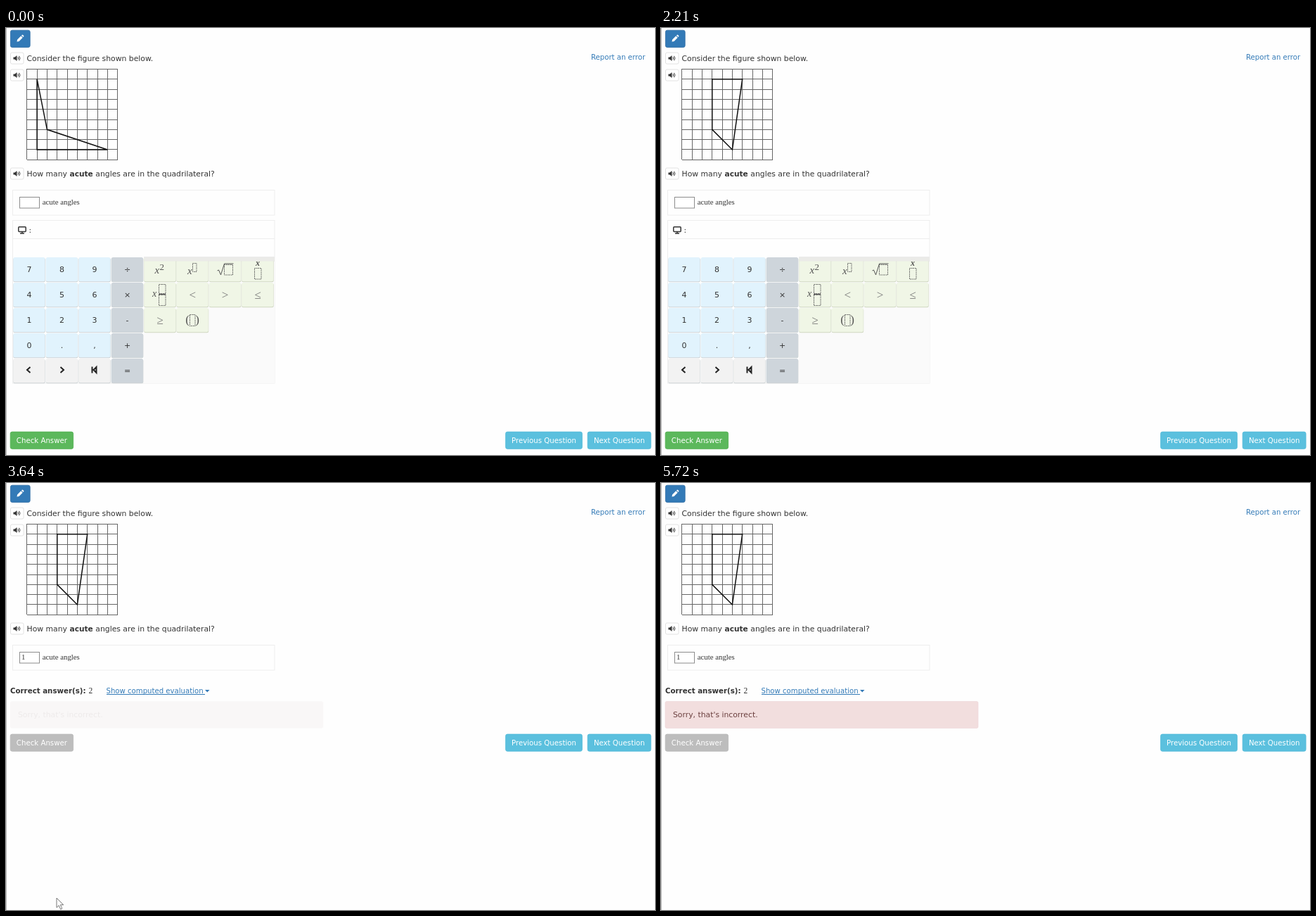
An HTML page that plays this animation: 923x607 px, repeating every 6.11 s.

```html
<!DOCTYPE html>
<html lang="en">
<head>
<meta charset="utf-8">
<title>Acute angles</title>
<style>
html, body { margin: 0; width: 100%; height: 100%; overflow: hidden; background: #fefefe; }
svg { display: block; width: 923px; height: 607px; }
text { font-family: "DejaVu Sans", Verdana, sans-serif; font-size: 10.82px; fill: #333; white-space: pre; }
.small { font-size: 10.15px; }
.key { font-size: 11px; text-anchor: middle; }
.label { font-size: 10.2px; text-anchor: middle; fill: #fff; }
.bold { font-weight: bold; font-size: 10.6px; }
.link { fill: #337ab7; }
.serif { font-family: "Liberation Serif", "Times New Roman", serif; }
.math { font-family: "Liberation Serif", "Times New Roman", serif; font-style: italic; font-size: 15px; fill: #555; }
.upright { font-style: normal; font-size: 17px; }
.sign { font-family: "Liberation Serif", "Times New Roman", serif; font-size: 17px; fill: #777; text-anchor: middle; }
.slot { fill: none; stroke: #555; stroke-dasharray: 1.5 1; }
</style>
</head>
<body>
<svg id="stage" viewBox="0 0 923 607"></svg>
<script>
const LOOP = 6110, STEP = 130;
const CELL = 14.32, LEFT = 29.8, TOP = 58.4;
const stage = document.getElementById('stage');

const rect = (x, y, w, h, fill, more = '') =>
  `<rect x="${x}" y="${y}" width="${w}" height="${h}" fill="${fill}" ${more}/>`;
const text = (x, y, s, cls = '', more = '') =>
  `<text x="${x}" y="${y}" class="${cls}" ${more}>${s}</text>`;
const path = (d, more) => `<path d="${d}" ${more}/>`;
const group = (id, body) => `<g id="${id}">${body}</g>`;
const slot = (x, y, w, h) => rect(x, y, w, h, 'none', 'class="slot"');
const line = 'fill="none" stroke="#333" ';

function button(x, y, w, label, fill, edge, id = '') {
  return rect(x + .4, y + .1, w - .8, 24.2, fill, `rx="2.5" id="${id}" stroke="${edge}" stroke-width=".8"`) +
    text(x + w / 2, y + 16.2, label, 'label');
}

function speaker(y) {
  return rect(6.5, y - 8, 18.5, 16, '#fff', 'rx="2" stroke="#e2e2e2"') +
    path(`M10.5 ${y - 1.5}h2l3-2.5v8l-3-2.5h-2z`, 'fill="#333"') +
    path(`M17 ${y - 1.8}q1.4 1.8 0 3.6M18.6 ${y - 3.2}q2.6 3.2 0 6.4`, line);
}

function grid() {
  let d = '';
  for (let i = 0; i < 10; i++) {
    const p = i * CELL;
    d += `M${LEFT + p} ${TOP}v${CELL * 9}M${LEFT} ${TOP + p}h${CELL * 9}`;
  }
  return path(d, 'stroke="#666" shape-rendering="crispEdges"');
}

const shapes = [
  [[1, 1], [2, 6], [8, 8], [1, 8]],
  [[4, 1], [6, 3], [6, 8], [3, 8]],
  [[3, 1], [6, 1], [5, 8], [3, 6]]
].map((pts, i) => {
  const at = pts.map(([x, y]) => [LEFT + x * CELL, TOP + y * CELL]);
  return `<polygon id="shape${i}" points="${at.join(' ')}" fill="none" stroke="#111" stroke-width="1.5"/>`;
}).join('');

function key(col, row, fill, label = '', edge = '#cdd3d5', cls = 'key', drop = 21) {
  const x = 10.3 + col * 46.5, y = 326 + row * 36;
  return rect(x, y + .8, 45.6, 34.4, edge, 'rx="2.5"') +
    rect(x, y, 45.2, 34.2, fill, 'rx="2.5"') +
    text(x + 22.7, y + drop, label, cls);
}

function keypad() {
  let out = rect(9.5, 273.5, 372.5, 231.5, '#fefefe', 'stroke="#eee"') +
    path('M10 299.5h372', 'stroke="#eee"') +
    rect(196, 325, 186, 180, '#fafafa') + rect(196, 325, 186, 7, '#ebebeb');
  ['789÷', '456×', '123-', '0.,+', '   ='].forEach((keys, row) =>
    [...keys].forEach((k, col) => {
      out += key(col, row, col == 3 ? '#ced5db' : row == 4 ? '#f2f2f2' : '#e1f3fd', k.trim());
    }));
  ['', '', '', '', '', '&lt;', '&gt;', '≤', '≥', ''].forEach((s, i) => {
    out += key(4 + i % 4 * .995, i >> 2, '#f0f6e6', s, '#cfd6c0', 'sign', 23);
  });
  return out + rect(197, 326, 185, 5.5, '#ebebe8') +
    text(211.5, 349, 'x', 'math') + text(218.5, 344, '2', 'math', 'style="font-style:normal;font-size:13px"') +
    text(258, 350, 'x', 'math') + slot(265.5, 334.5, 5.5, 12) +
    path('M300.5 345l2-1 3 7 5-16h13', 'fill="none" stroke="#555"') + slot(310.5, 336.5, 12, 14.5) +
    text(355, 338, 'x', 'math', 'style="font-size:12px;font-weight:bold"') + slot(353.5, 341.5, 9.5, 15.5) +
    text(208, 382, 'x', 'math', 'style="font-size:14px"') + slot(217.5, 364.5, 9.5, 13) + slot(217.5, 379.5, 9.5, 15) +
    path('M217 378.5h10.5', 'stroke="#555"') +
    text(255.3, 420, '(', 'math upright') + text(269.2, 420, ')', 'math upright') + slot(261.5, 407.5, 7.5, 16) +
    path('M34.5 482l-4.5 4 4.5 4M77.5 482l4.5 4-4.5 4M128.5 482l-4 4 4 4zM122.5 481.5v9',
      'fill="none" stroke="#222" stroke-width="2"') +
    rect(17.8, 282.8, 10.4, 6.6, 'none', 'stroke="#333" stroke-width="1.5" rx="1"') +
    path('M20 292h6M23 289v3', line + 'stroke-width="1.5"') +
    text(32.5, 291, ':') + text(40, 291, '1', '', 'id="echo"');
}

const nav = (y, id) => button(710.2, y, 109.6, 'Previous Question', '#5bc0de', '#4fb9d9') +
  button(826.8, y, 90.7, 'Next Question', '#5bc0de', '#4fb9d9', id);

stage.innerHTML =
  rect(0, 0, 1, 607, '#bcbcbc') +
  rect(6.4, 3.2, 27.8, 24.2, '#337ab7', 'rx="2.5" stroke="#2e6da4" stroke-width=".8"') +
  path('M15.5 19.5l.6-3 5.2-5.2 2.4 2.4-5.2 5.2zM22 10.6l1-.9q.6-.4 1.2.2l1 1q.6.6 0 1.2l-.8.9z', 'fill="#fff"') +
  speaker(43) + speaker(67) + speaker(207) +
  text(29.5, 46.5, 'Consider the figure shown below.') +
  text(832, 45.3, 'Report an error', 'small link') +
  grid() + shapes +
  text(29.5, 211, 'How many ') + text(90.5, 211, 'acute', 'bold') +
  text(127.3, 211, 'angles are in the quadrilateral?') +
  rect(9.5, 230.5, 372.5, 35.5, '#fefefe', 'stroke="#eee"') +
  rect(19.5, 240.5, 28, 15.5, '#fff', 'stroke="#8c8c8c"') +
  text(51.7, 251, 'acute angles', 'serif') +
  text(22, 251, '1', 'serif', 'id="typed"') +
  path('M28 243v11', 'stroke="#777" stroke-width=".8" id="caret"') +
  group('asking', keypad() + button(5.8, 574, 90.2, 'Check Answer', '#5cb85c', '#4cae4c', 'check')) +
  group('plainNav', nav(574, 'next')) +
  group('checkNav', button(665.3, 574, 109.7, 'Previous Question', '#5bc0de', '#3a93b8') +
    button(781.8, 574, 135.7, 'Check &amp; Next Question', '#5bc0de', '#3a93b8')) +
  group('result',
    text(6, 299, 'Correct answer(s):', 'bold', 'style="font-size:10.25px"') +
    text(117.5, 299, '2', 'serif', 'style="font-size:11.5px"') +
    text(142.5, 298.5, 'Show computed evaluation', 'small link') +
    path('M143 300.5h140', 'stroke="#337ab7"') + path('M283 294h6.5l-3.25 3.5z', 'fill="#337ab7"') +
    rect(6, 310.5, 445, 38, '#fafafa', 'rx="2"') +
    group('alert', rect(6, 310.5, 445, 38, '#f2dede', 'rx="2" stroke="#eed5d8" stroke-width=".6"') +
      text(17, 333, "Sorry, that's incorrect.", '', 'style="fill:#6b3f3e"')) +
    button(5.8, 357, 90.2, 'Check Answer', '#bdbdbd', '#b8b8b8') + nav(357, 'after')) +
  path('M0 0v13.5l3.2-3 2.4 5.4 2.2-1-2.4-5.2h4.3z', 'id="arrow" fill="#fff" stroke="#555" stroke-width=".8"') +
  path('M-1.2 1q1.2-1.6 2.4 0v4q2-.8 2.4.6 1.7-.5 2 .7 1.6-.2 1.6 1.2v2.5l-1.2 3h-6l-3.6-4.5q0-1.6 1.4-1l1 1z',
    'id="hand" fill="#fff" stroke="#333" stroke-width=".9"');

// Pointer trips: each is a list of [time, x, y]
const trips = [
  [[260, 885, 599], [520, 867, 583], [2080, 867, 583]],
  [[2340, 430, 380], [2470, 36, 249], [2860, 36, 249], [3250, 75, 550], [3380, 68, 583], [3510, 68, 584], [3640, 72, 590], [3770, 73, 602]],
  [[4550, 330, 602], [4810, 478, 562], [5070, 515, 585], [5200, 525, 597], [5460, 525, 597]]
];

function pointer(t) {
  const trip = trips.find(p => t >= p[0][0] && t <= p[p.length - 1][0]);
  if (!trip) return null;
  const i = Math.max(1, trip.findIndex(p => p[0] >= t));
  const [a, b] = [trip[i - 1], trip[i]];
  const k = (t - a[0]) / (b[0] - a[0]);
  return [a[1] + (b[1] - a[1]) * k, a[2] + (b[2] - a[2]) * k];
}

const el = id => document.getElementById(id);
const show = (id, on) => { el(id).style.display = on ? '' : 'none'; };

function draw(now) {
  const t = Math.floor(now % LOOP / STEP) * STEP;
  const question = t < 780 ? 0 : t < 1690 ? 1 : 2;
  const typed = t >= 2860, done = t >= 3640;
  const onNext = t >= 260 && t < 2210, onCheck = t >= 3380 && t < 3640;
  for (let i = 0; i < 3; i++) show('shape' + i, i == question);
  show('typed', typed);
  show('echo', typed);
  show('caret', t >= 2470 && t < 3510);
  show('asking', !done);
  show('plainNav', !typed);
  show('checkNav', typed && !done);
  show('result', done);
  el('next').setAttribute('fill', onNext ? '#31b0d5' : '#5bc0de');
  el('check').setAttribute('fill', onCheck ? '#449d44' : '#5cb85c');
  el('alert').style.opacity = Math.min(1, Math.max(0, .08 + (t - 3640) / 520));

  const at = pointer(t), hand = onNext || onCheck;
  show('hand', at && hand);
  show('arrow', at && !hand);
  if (at) el(hand ? 'hand' : 'arrow').setAttribute('transform', `translate(${at})`);
}

const start = performance.now();
function tick() {
  draw(performance.now() - start);
  requestAnimationFrame(tick);
}
tick();
</script>
</body>
</html>
```
